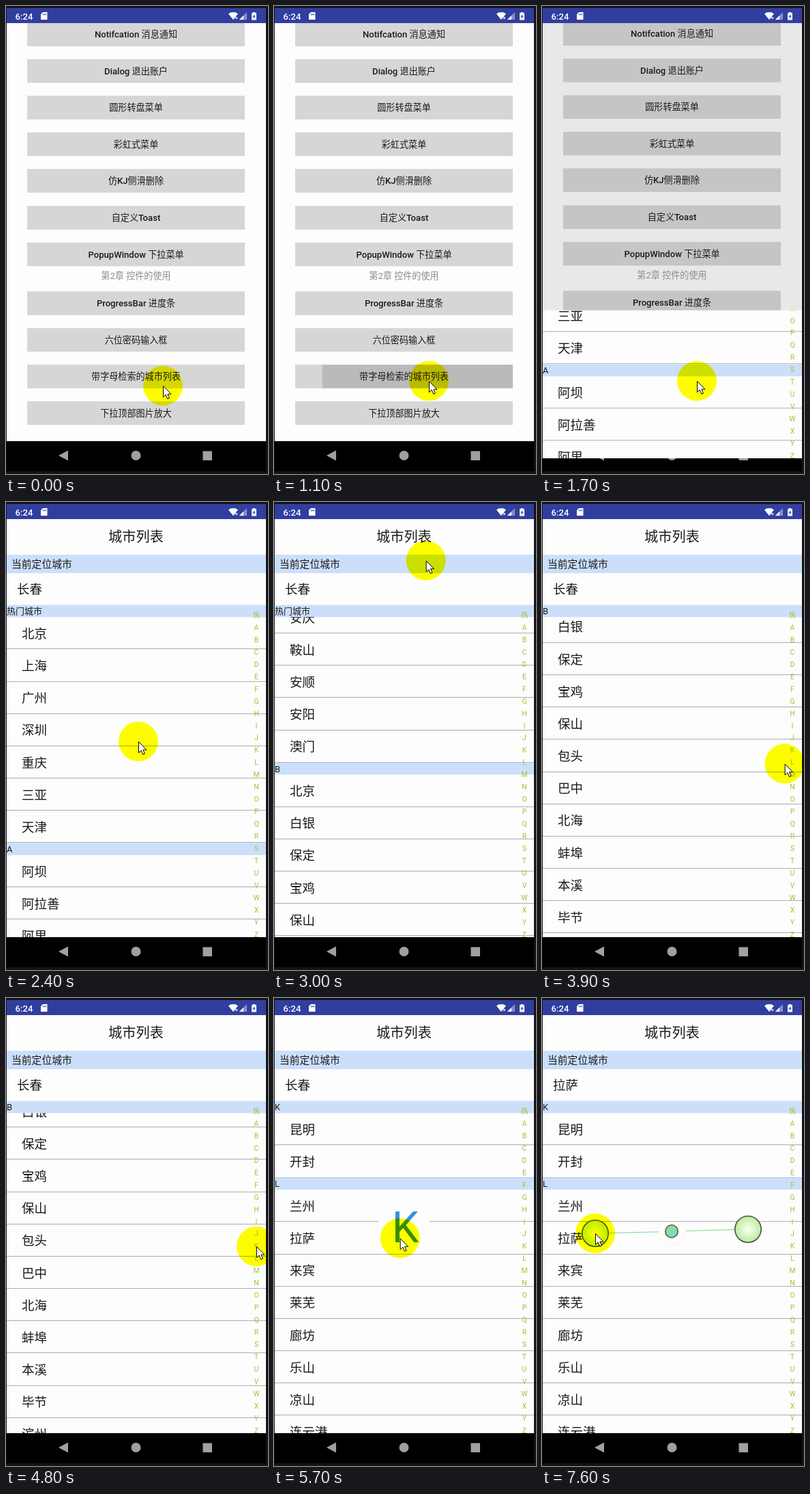
An HTML page with a canvas for the animation above (7700 ms loop, 384x684 px).

```html
<!DOCTYPE html>
<html lang="zh-CN">
<head>
<meta charset="utf-8">
<style>
html, body { margin: 0; width: 100%; height: 100%; overflow: hidden; background: #141414; }
canvas { display: block; }
</style>
</head>
<body>
<canvas id="stage" width="384" height="684"></canvas>
<script>
const ctx = document.getElementById('stage').getContext('2d');
const LOOP = 7700, STEP = 100;
const PAGE = '#fdfdfd', BAND = '#cbdffb', INK = '#1a1a1a', LINE = '#adadb2';
const STATUS = '#303f9f', EDGE = '#141414';
const LEFT = 1, RIGHT = 381, TOP = 25, BOTTOM = 636;
const LIST_TOP = 150.5, ROW = 47.17, HEADER = 17.7;

const BUTTONS = [
  [41.5, 'Notifcation 消息通知'], [95, 'Dialog 退出账户'], [148.5, '圆形转盘菜单'],
  [202, '彩虹式菜单'], [255.5, '仿KJ侧滑删除'], [309.5, '自定义Toast'],
  [363, 'PopupWindow 下拉菜单'], [434.5, 'ProgressBar 进度条'], [488, '六位密码输入框'],
  [541.5, '带字母检索的城市列表'], [595, '下拉顶部图片放大']
];
const PRESSED = 541.5;

const FIRST_PART = [
  ['热门城市', '北京 上海 广州 深圳 重庆 三亚 天津'],
  ['A', '阿坝 阿拉善 阿里 安康 安庆 鞍山 安顺 安阳 澳门'],
  ['B', '北京 白银 保定 宝鸡 保山 包头 巴中 北海 蚌埠 本溪 毕节 滨州 亳州']
];
const K_PART = [
  ['K', '昆明 开封'],
  ['L', '兰州 拉萨 来宾 莱芜 廊坊 乐山 凉山 连云港 丽江']
];
const INDEX = ['热', ...'ABCDEFGHIJKLMNOPQRSTUVWXYZ'];

// time, x, y of the pointer
const POINTER = [
  [0, 230, 555], [100, 230, 555], [300, 227, 548], [1900, 227, 548],
  [2400, 194, 350], [2700, 205, 54], [2900, 215, 60], [3500, 318, 404],
  [4000, 360, 380], [4400, 367, 363], [5200, 367, 363], [6050, 78, 344], [LOOP, 78, 344]
];

const clamp = v => Math.min(1, Math.max(0, v));
const progress = (t, from, to) => clamp((t - from) / (to - from));
const smooth = u => u * u * (3 - 2 * u);

function rect(x, y, w, h, color) {
  ctx.fillStyle = color;
  ctx.fillRect(x, y, w, h);
}

function disc(x, y, r, fill, stroke) {
  ctx.beginPath();
  ctx.arc(x, y, r, 0, 7);
  if (fill) { ctx.fillStyle = fill; ctx.fill(); }
  if (stroke) { ctx.strokeStyle = stroke; ctx.stroke(); }
}

function shape(points, fill, stroke) {
  ctx.beginPath();
  points.forEach(([x, y]) => ctx.lineTo(x, y));
  ctx.closePath();
  ctx.fillStyle = fill;
  ctx.fill();
  if (stroke) { ctx.strokeStyle = stroke; ctx.stroke(); }
}

// y is the vertical centre of the glyphs
function text(str, x, y, size, color = INK, align = 'left', weight = 400) {
  ctx.font = `${weight} ${size}px Roboto, "Noto Sans CJK SC", "Noto Sans CJK", sans-serif`;
  ctx.textAlign = align;
  ctx.fillStyle = color;
  ctx.fillText(str, x, y + size * 0.37);
}

function clipped(x, y, w, h, draw) {
  ctx.save();
  ctx.beginPath();
  ctx.rect(x, y, w, h);
  ctx.clip();
  draw();
  ctx.restore();
}

function pointerAt(t) {
  const i = POINTER.findIndex(key => key[0] > t);
  const [t0, x0, y0] = POINTER[i - 1], [t1, x1, y1] = POINTER[i];
  const u = smooth(progress(t, t0, t1));
  return { x: x0 + (x1 - x0) * u, y: y0 + (y1 - y0) * u };
}

// the list follows the drag, then coasts to rest
function scrollAt(t) {
  if (t < 2400) return 0;
  if (t < 2700) return 350 - pointerAt(t).y;
  return 863.4 - 567.4 * (1 - progress(t, 2700, 4700)) ** 3.85;
}

function drawStatusBar() {
  rect(LEFT, 3, RIGHT - LEFT, TOP - 3, STATUS);
  text('6:24', 13.5, 15, 13.2, '#fff', 'left', 500);
  shape([[54, 9], [60.5, 9], [60.5, 20], [51, 20], [51, 12]], '#fff');
  [54, 56, 58].forEach(x => rect(x, 11, 1, 2.5, STATUS));
  shape([[326, 11.5], [329, 9.5], [333, 9], [337, 9.5], [340, 11.5], [333, 20]], '#fff');
  text('×', 337.5, 17, 8, '#fff', 'center', 700);
  shape([[342, 20], [353, 9], [353, 20]], '#8490c8');
  shape([[342, 20], [348, 14], [348, 20]], '#fff');
  rect(360, 10, 7, 10.5, '#fff');
  rect(362, 9, 3, 2, '#fff');
  shape([[364.5, 11.5], [361.5, 16], [363.2, 16], [362.6, 19], [365.6, 14.6], [363.8, 14.6]], STATUS);
}

function drawNavigation() {
  rect(LEFT, BOTTOM, RIGHT - LEFT, 680 - BOTTOM, '#000');
  const icon = '#a0a0a0';
  shape([[77, 657], [91, 649.5], [91, 664.5]], icon);
  disc(190.5, 657, 7, icon);
  rect(288.5, 650.5, 13.5, 13.5, icon);
}

function drawMenu(t, opening) {
  const dimmed = t >= 1600;
  const dy = -9 * opening ** 1.6;
  clipped(LEFT, TOP, RIGHT - LEFT, BOTTOM - TOP, () => {
    rect(0, TOP, 384, BOTTOM, dimmed ? '#e8e8e8' : PAGE);
    BUTTONS.forEach(([centre, label]) => {
      const y = centre + dy;
      rect(31, y - 17.3, 319, 34.6, dimmed ? '#c5c5c5' : '#d6d6d6');
      if (centre === PRESSED && t >= 900) drawRipple(t, y);
      text(label, 190.5, y, 13.1, INK, 'center', 500);
    });
    text('第2章 控件的使用', 190.5, 394 + dy, 13.1, '#8c8c8c', 'center');
  });
}

function drawRipple(t, y) {
  const fade = 1 - progress(t, 1100, 1400);
  clipped(31, y - 17.3, 319, 34.6, () =>
    disc(227, y, 30 + 190 * progress(t, 900, 1200), `rgba(0,0,0,${0.13 * fade})`));
}

function drawList(sections, scroll) {
  let y = LIST_TOP - scroll;
  for (const [name, cities] of sections) {
    rect(LEFT, y, RIGHT - LEFT, HEADER, BAND);
    text(name, 1, y + 9, 13);
    y += HEADER;
    cities.split(' ').forEach(city => {
      text(city, 23, y + 23.8, 18.5);
      y += ROW;
      rect(LEFT, Math.round(y - 1), RIGHT - LEFT, 1, LINE);
    });
  }
}

function drawCityPage(t) {
  const jumped = t >= 5000;
  const scroll = jumped ? 0 : scrollAt(t);
  rect(LEFT, TOP, RIGHT - LEFT, BOTTOM - TOP, PAGE);
  clipped(LEFT, LIST_TOP, RIGHT - LEFT, BOTTOM - LIST_TOP,
    () => drawList(jumped ? K_PART : FIRST_PART, scroll));

  text('城市列表', 190.5, 51, 20.2, INK, 'center');
  rect(LEFT, 77, RIGHT - LEFT, 27, BAND);
  text('当前定位城市', 8, 90.7, 14.8);
  text(t < 6400 ? '长春' : '拉萨', 16, 127.5, 18.5);

  rect(LEFT, LIST_TOP, RIGHT - LEFT, HEADER, BAND);
  text(jumped ? 'K' : scroll < 789 ? '热门城市' : 'B', 1, LIST_TOP + 9, 13);
  INDEX.forEach((letter, i) => text(letter, 367, 165 + i * 17.96, 10.5, '#9fc436', 'center'));

  if (jumped && t < 6000) {
    rect(153, 293, 75, 75, PAGE);
    text('K', 192.5, 333.5, 63, '#358ee6', 'center');
  }
}

function drawOpeningPage(t, opening) {
  const dy = 28 * (1 - opening ** 1.6);
  const bottom = BOTTOM + dy;
  const top = TOP + (661 - TOP) * (1 - opening) ** 1.55;
  clipped(LEFT, top, RIGHT - LEFT, bottom - top, () => {
    ctx.translate(0, dy);
    drawCityPage(t);
  });
}

function drawLinkedDots() {
  ctx.lineWidth = 1;
  ctx.strokeStyle = '#76dc84';
  ctx.beginPath();
  ctx.moveTo(98, 343.5); ctx.lineTo(171, 341.8);
  ctx.moveTo(212, 340.5); ctx.lineTo(282, 338.5);
  ctx.stroke();
  ctx.setLineDash([1, 2]);
  disc(190, 341, 20.5, null, '#dcdcdc');
  ctx.setLineDash([]);
  ctx.lineWidth = 1.6;
  [[78, 344], [302, 338]].forEach(([x, y]) => {
    const glow = ctx.createRadialGradient(x, y, 2, x, y, 19);
    glow.addColorStop(0, '#f4ffea');
    glow.addColorStop(1, '#bdeb9f');
    disc(x, y, 19.2, glow, '#46573f');
  });
  disc(190, 341, 9.2, '#8bd9ab', '#45604f');
  ctx.lineWidth = 1;
}

function drawPointer({ x, y }) {
  ctx.globalCompositeOperation = 'multiply';
  disc(x, y, 29, '#ff0');
  ctx.globalCompositeOperation = 'source-over';
  const arrow = [[0, 0], [0, 16], [3.7, 12.6], [6.3, 18.6], [8.9, 17.5], [6.4, 11.7], [11.4, 11.7]];
  ctx.lineWidth = 1;
  shape(arrow.map(([dx, dy]) => [x + dx + 0.5, y + dy + 0.5]), '#fff', '#000');
}

function draw(t) {
  const opening = progress(t, 1600, 2025);
  rect(0, 0, 384, 684, EDGE);
  drawStatusBar();
  drawNavigation();
  if (opening < 1) drawMenu(t, opening);
  if (opening === 1) drawCityPage(t);
  else if (t >= 1600) drawOpeningPage(t, opening);
  if (t >= 7600) drawLinkedDots();
  drawPointer(pointerAt(t));
}

const start = performance.now();
function tick() {
  const t = (performance.now() - start) % LOOP;
  draw(Math.floor(t / STEP) * STEP);
  requestAnimationFrame(tick);
}
tick();
</script>
</body>
</html>
```
